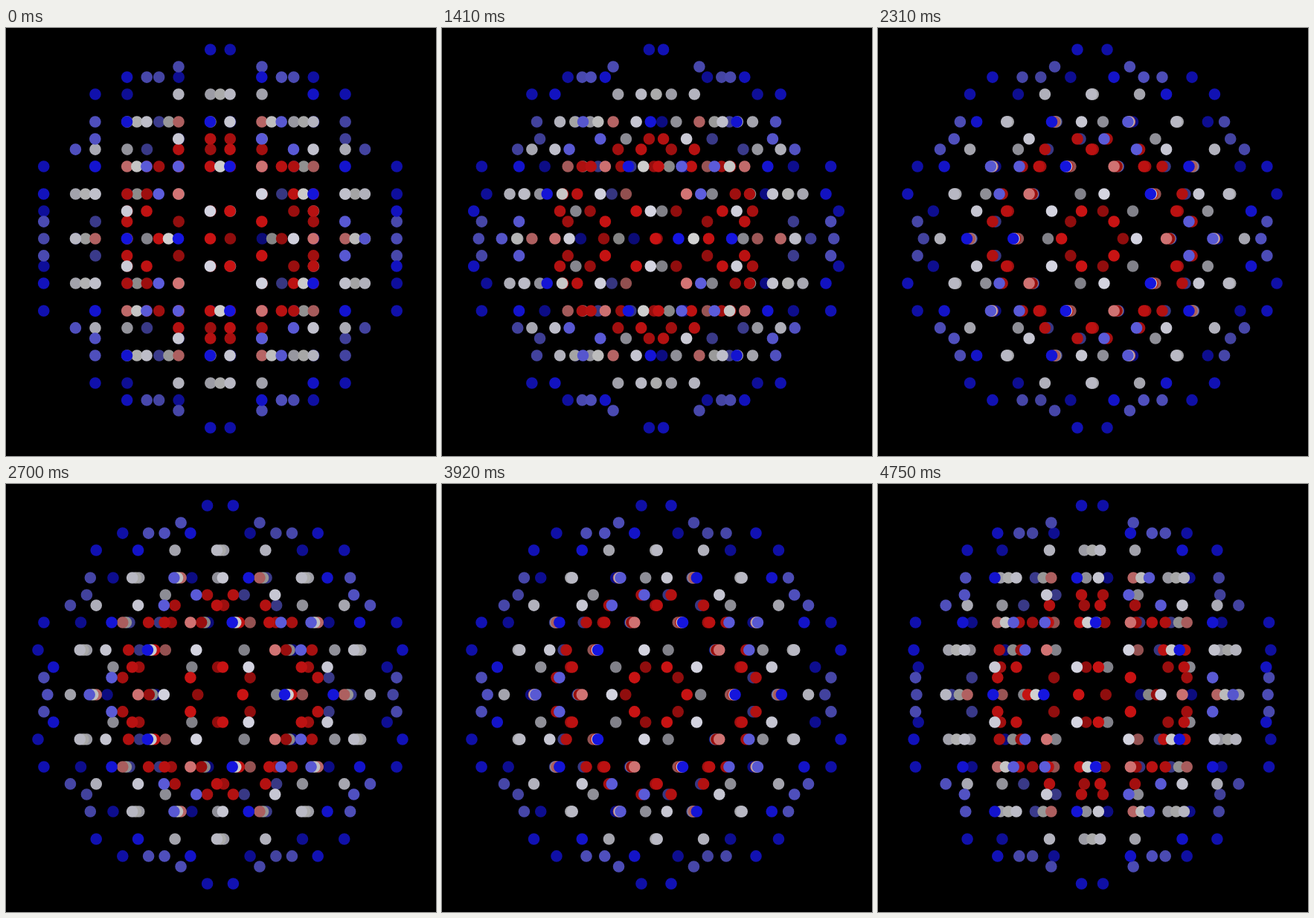
Recreate the animation shown at these times as an HTML page with a canvas. Size 578 by 575 pixels, loop 4850 ms.

```html
<!DOCTYPE html>
<html lang="en">
<head>
<meta charset="utf-8">
<title>Icosahedral shells</title>
<style>
  html, body { margin: 0; width: 100%; height: 100%; overflow: hidden; background: #000; }
  canvas { display: block; }
</style>
</head>
<body>
<canvas id="stage" width="578" height="575"></canvas>
<script>
const ctx = document.getElementById('stage').getContext('2d');
const LOOP = 4850, CX = 288, CY = 283, SCALE = 22.9, RADIUS = 7.8, SHADE = 0.028;
const p = (1 + Math.sqrt(5)) / 2;

// Each shell is the full icosahedral orbit of one seed point.
const shells = [
  { seed: [p ** 5, p, 0], color: [16, 16, 172] },
  { seed: [p * p, 2 + 5 * p, 0], color: [73, 73, 174] },
  { seed: [p ** 4, 0, 1 + 3 * p], color: [170, 170, 180] },
  { seed: [2 * p ** 3, 0, 0], color: [171, 171, 171] },
  { seed: [p ** 3, p ** 3, p ** 3], color: [178, 98, 98] },
  { seed: [0, 1 + 3 * p, p], color: [172, 16, 16] }
];

const generators = [
  ([x, y, z]) => [y, z, x],
  ([x, y, z]) => [-x, y, z],
  ([x, y, z]) => [
    (x - p * y + z / p) / 2,
    (p * x + y / p - z) / 2,
    (x / p + y + p * z) / 2
  ]
];

function orbit(seed) {
  const key = v => v.map(c => Math.round(c * 100)).join();
  const points = [seed], seen = new Set([key(seed)]);
  for (const point of points) {
    for (const move of generators) {
      const next = move(point);
      if (!seen.has(key(next))) {
        seen.add(key(next));
        points.push(next);
      }
    }
  }
  return points;
}

const dots = shells.flatMap(({ seed, color }) =>
  orbit(seed).map(point => ({ point, color })));

// Runs of picture changes: first time, last time, count.
const runs = [
  [60, 530, 9], [590, 1070, 10], [1130, 1650, 10], [1710, 2190, 9], [2250, 2760, 10],
  [2820, 3300, 9], [3360, 3870, 10], [3920, 4390, 9], [4450, 4750, 6]
];
const ticks = [0];
for (const [first, last, count] of runs) {
  for (let i = 0; i < count; i++) {
    ticks.push(Math.floor((first + (last - first) * i / (count - 1)) / 10 + 1e-6) * 10);
  }
}

// Turn angle in degrees; the speed wavers slightly around 0.151 per ms.
const turn = [
  [0, 111], [640, 14], [1410, -105], [1890, -175],
  [2700, -298], [3920, -482.7], [4750, -607]
];

function angleAt(t) {
  let i = 1;
  while (i < turn.length - 1 && t > turn[i][0]) i++;
  const [t0, a0] = turn[i - 1], [t1, a1] = turn[i];
  return (a0 + (a1 - a0) * (t - t0) / (t1 - t0)) * Math.PI / 180;
}

function draw(t) {
  const angle = angleAt(t), c = Math.cos(angle), s = Math.sin(angle);
  ctx.fillStyle = '#000';
  ctx.fillRect(0, 0, 578, 575);
  dots
    .map(({ point: [x, y, z], color }) => ({
      x: CX + SCALE * (z * c - x * s),
      y: CY - SCALE * y,
      depth: z * s + x * c,
      color
    }))
    .sort((a, b) => a.depth - b.depth)
    .forEach(({ x, y, depth, color }) => {
      const light = 1 + SHADE * depth;
      ctx.fillStyle = `rgb(${color.map(v => Math.round(v * light)).join()})`;
      ctx.beginPath();
      ctx.arc(x, y, RADIUS, 0, 2 * Math.PI);
      ctx.fill();
    });
}

function frame() {
  const now = performance.now() % LOOP;
  draw(ticks.findLast(tick => tick <= now));
  requestAnimationFrame(frame);
}
frame();
</script>
</body>
</html>
```
